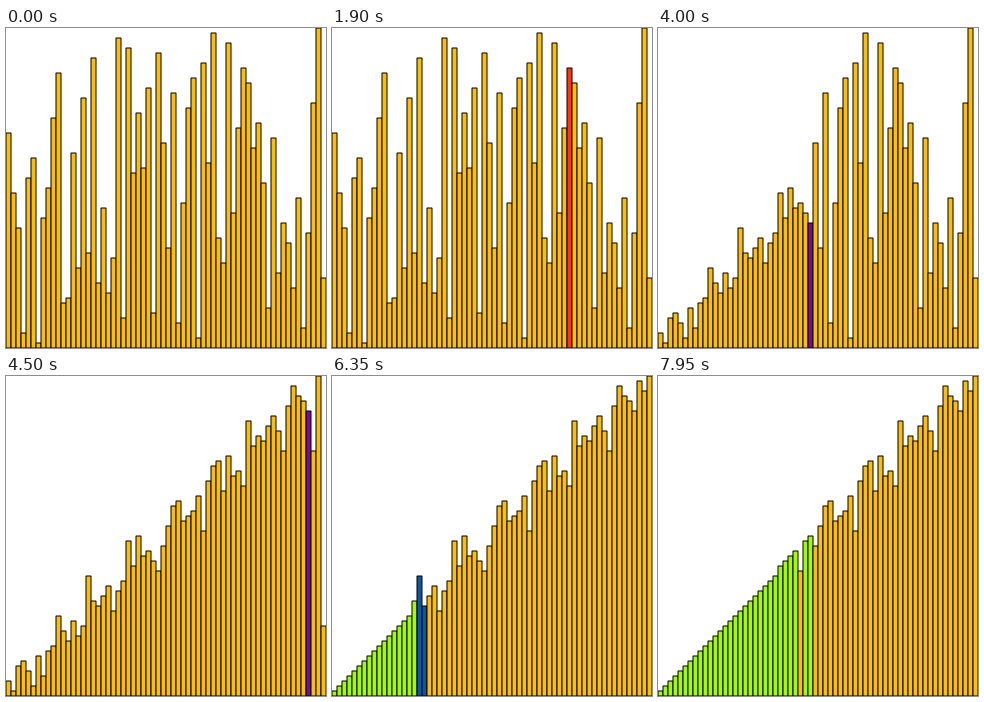
Write a matplotlib script that moves like this. It is 320 by 320 pixels and loops after 8 s.

```python
import matplotlib.pyplot as plt
from matplotlib.animation import FuncAnimation
from matplotlib.patches import Rectangle

SIZE = 320
STEP = 5
FRAMES = 160
INTERVAL = 50
TICKS_PER_FRAME = 3
BUCKET = 8

PLAIN = "#fdbe08"
SCAN = "#ff380e"
WRITE = "#780a9e"
COMPARE = "#0a58a0"
SORTED = "#a4fb00"

# the shuffled input: each height from 1 to 64 once
START = [43, 31, 24, 3, 34, 38, 1, 26, 32, 46, 55, 9, 10, 39, 16, 50,
         19, 58, 13, 28, 11, 18, 62, 6, 60, 35, 47, 36, 52, 7, 59, 41,
         20, 51, 5, 29, 48, 54, 2, 57, 37, 63, 22, 17, 61, 27, 44, 56,
         53, 40, 45, 33, 8, 42, 15, 25, 21, 12, 30, 4, 23, 49, 64, 14]


def bucket_sort(values):
    """Yield (heights, colours, ticks) for each step of the sort."""
    a = list(values)
    n = len(a)
    done = set()

    def show(ticks, color=PLAIN, *marked):
        colors = [SORTED if v in done else PLAIN for v in a]
        for i in marked:
            colors[i] = color
        return list(a), colors, ticks

    yield show(18)

    # look for the maximum, then hand the bars out from the right
    for i in range(n):
        yield show(1, SCAN, i)
    for i in reversed(range(n)):
        yield show(2, SCAN, i)

    # write the buckets back, keeping the order inside each one
    for i, v in enumerate(sorted(a, key=lambda v: (v - 1) // BUCKET)):
        a[i] = v
        yield show(1, WRITE, i)

    # insertion sort inside each bucket
    for first in range(0, n, BUCKET):
        for i in range(first, first + BUCKET):
            j = i
            while j > first:
                yield show(2, COMPARE, j - 1, j)
                if a[j - 1] < a[j]:
                    break
                a[j - 1], a[j] = a[j], a[j - 1]
                j -= 1
                yield show(1)
            done.add(a[j])
            yield show(1)


ticks = []
for heights, colors, length in bucket_sort(START):
    ticks += [(heights, colors)] * length

fig = plt.figure(figsize=(SIZE / 100, SIZE / 100), dpi=100, facecolor="white")
ax = fig.add_axes([0, 0, 1, 1])
ax.set_xlim(0, SIZE)
ax.set_ylim(0, SIZE)
ax.axis("off")

# unsnapped outlines straddle the pixel grid, which keeps them soft
bars = [ax.add_patch(Rectangle((STEP * i, 0), STEP, 0, edgecolor="black",
                               linewidth=0.72, joinstyle="miter", snap=False))
        for i in range(len(START))]


def draw(frame):
    heights, colors = ticks[frame * TICKS_PER_FRAME]
    for bar, h, color in zip(bars, heights, colors):
        bar.set_height(STEP * h)
        bar.set_facecolor(color)
    return bars


anim = FuncAnimation(fig, draw, frames=FRAMES, interval=INTERVAL,
                     repeat=True, repeat_delay=0)
plt.show()
```
